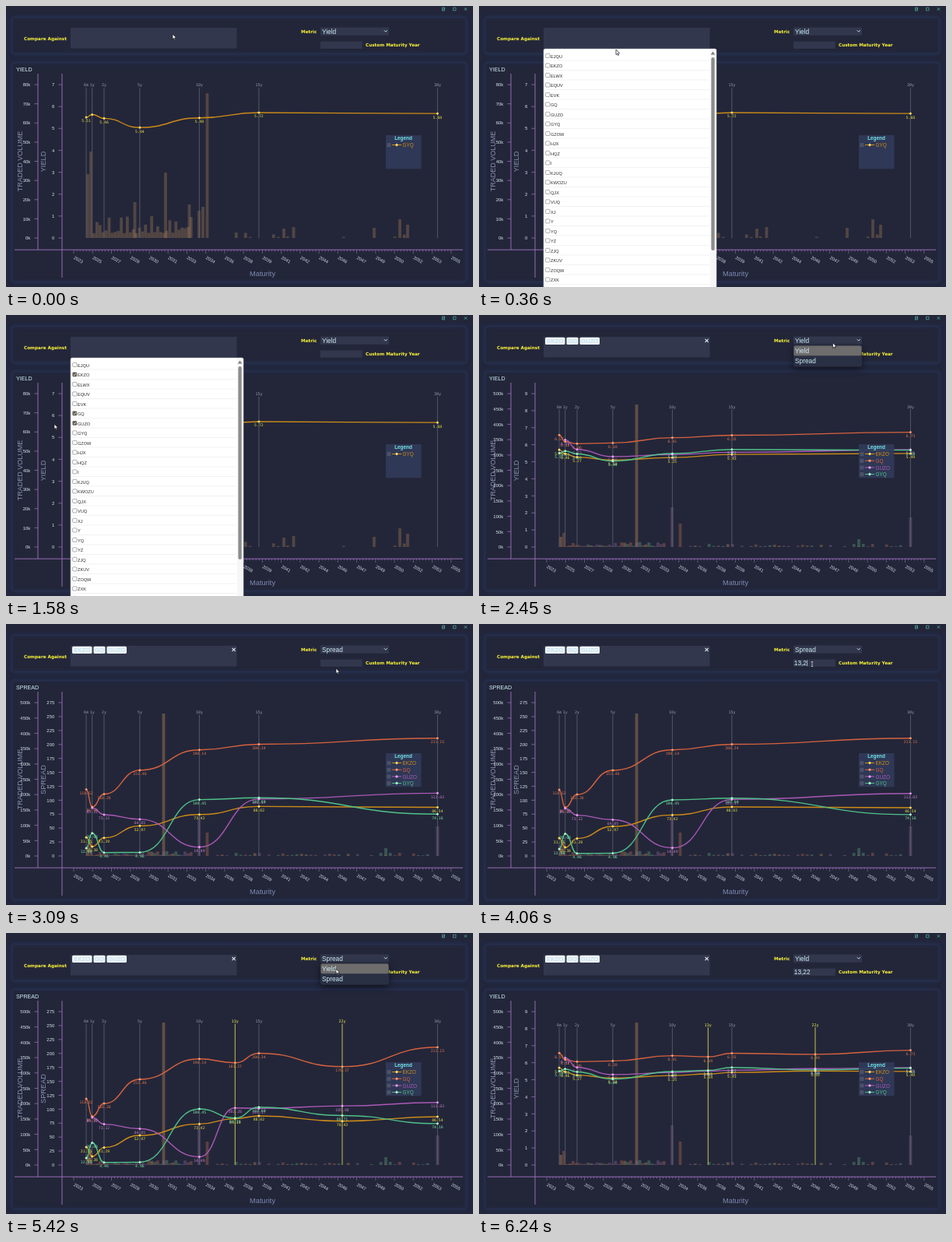
These frames come from a looping animation (600x361 px, 6.3 s). An HTML page with a canvas:

```html
<!DOCTYPE html>
<html lang="en">
<head>
<meta charset="utf-8">
<title>Yield comparison</title>
<style>
html, body { margin: 0; width: 100%; height: 100%; overflow: hidden; background: #22273d; }
canvas { display: block; width: 600px; height: 361px; }
</style>
</head>
<body>
<canvas id="stage"></canvas>
<script>
const W = 600, H = 361, LOOP = 6300, FLOOR = 298;
const canvas = document.getElementById('stage');
const g = canvas.getContext('2d');
const dpr = window.devicePixelRatio || 1;
canvas.width = W * dpr;
canvas.height = H * dpr;

const SANS = '"Liberation Sans", Arial, sans-serif';
const WIDE = '"DejaVu Sans", Verdana, sans-serif';
const MONO = '"DejaVu Sans Mono", monospace';
const PURPLE = '#a273c2', FIELD = '#32374d', PALE = '#d0eff5', YELLOW = '#fbf53a';
const TICK = '#d8e4ec', AXIS = '#8791b0';

// moments of the interaction, ms
const OPEN = 250, CLOSE = 1670, COMPARE = 1720, SPREAD = 2760, CUSTOM = 4330, BACK = 5500;
const TICKED = { EKZO: 730, GQ: 1010, GUZO: 1240 };
const TYPING = 3800, KEY = 80;
const POPUPS = [[2410, SPREAD], [5130, BACK]];
// arrival time, x, y
const STOPS = [
  [0, 214, 36], [360, 176, 56], [700, 89, 76], [990, 89, 126], [1220, 89, 138], [1550, 62, 140],
  [2400, 457, 34], [2700, 424, 57], [3600, 428, 50], [5100, 470, 31], [5400, 424, 46], [5950, 360, 140]
];
const TRAVEL = 420;

const ITEMS = ['EJQU', 'EKZO', 'ELWX', 'EQUV', 'EVK', 'GQ', 'GUZO', 'GYQ', 'GZOW', 'HJX', 'HQZ', 'I',
  'KJUQ', 'KWOZU', 'QJX', 'VUQ', 'XJ', 'Y', 'YQ', 'YZ', 'ZJQ', 'ZKUV', 'ZOQW', 'ZXK'];

const YEARS = [0.5, 1, 2, 5, 10, 13, 15, 22, 30];
const isCustom = y => y === 13 || y === 22;
// yield = risk-free rate + spread, unless a series brings its own rule
const RATE = [5.385, 5.31, 4.957, 4.57, 4.512, 4.512, 4.55, 4.731, 4.622];
const SOLO = [5.51, 5.63, 5.46, 5.04, 5.48, 5.55, 5.72, 5.58, 5.68];
const ORANGE = { line: '#cc8b18', dot: '#ffdf6a', label: '#e6df3e' };
const SERIES = [
  { name: 'EKZO', look: ORANGE,
    spread: [31.95, 15.38, 31.29, 52.97, 73.42, 83.13, 88.02, 78.43, 86.54] },
  { name: 'GQ', look: { line: '#d6623f', dot: '#ff9a70', label: '#e0764f' },
    spread: [118.52, 86.9, 110.26, 153.46, 190.14, 183.27, 200.34, 176.37, 211.15] },
  { name: 'GUZO', look: { line: '#aa59b6', dot: '#e9a0ee', label: '#c479cd' },
    spread: [null, 85.22, 73.12, 64.85, 14.49, 102.28, 101.37, 105.88, 112.02],
    rule: y => 5.75 - 0.95 * Math.exp(-y / 9.5) + 2.6 * Math.exp(-y / 1.6) },
  { name: 'GYQ', look: { line: '#4fc289', dot: '#b4f7cf', label: '#7de3a5' },
    spread: [12.4, 39.68, 4.46, 4.96, 100.45, 84.2, 103.6, 88.71, 74.16],
    rule: (y, i) => SOLO[i] }
];
for (const one of SERIES)
  one.yield = one.spread.map((v, i) => v === null ? null : one.rule ? one.rule(YEARS[i], i) : RATE[i] + v / 100);

// volume bars: seeded noise, dense up to 2033 and sparse after, under a few peaks
const BAR = ['#c08f5c', '#b56a52', '#8b6496', '#5fa081'];
function makeBars(seed, dense, sparse, chance, peaks) {
  const rand = () => (seed = (seed * 16807) % 2147483647) / 2147483647;
  const list = peaks.map(([x, h], i) => [x, h, i % 4]);
  for (let x = 113; x < 545; x += x < 238 ? 3.9 : 6) {
    const r = rand(), hue = Math.floor(rand() * 4);
    if (x < 238) list.push([x, dense * (0.25 + r * r), hue]);
    else if (x > 270 && rand() < chance) list.push([x, 1 + sparse * r * r, hue]);
  }
  return list;
}
const SOLO_BARS = makeBars(5, 24, 6, 0.25, [[105, 82], [109, 111], [165.5, 46], [205, 84], [235.5, 43],
  [248, 35], [253, 40], [258.5, 186], [357, 12], [369.5, 14], [473, 13], [506, 24], [516, 17]]);
const MIX_BARS = makeBars(11, 5, 3, 0.7, [[202.5, 183], [109, 18], [248, 51], [488, 10], [105, 13],
  [258.5, 30], [554.5, 38]]);

const lerp = (a, b, k) => a + (b - a) * k;
const ease = k => { k = Math.min(1, Math.max(0, k)); return k * k * (3 - 2 * k); };
const yearX = y => 95.4 + 15.3 * y;
const valueY = (v, top) => FLOOR - v * 197 / top;

function box(x, y, w, h, fill, r = 0, stroke) {
  g.beginPath();
  g.roundRect(x, y, w, h, r);
  if (fill) { g.fillStyle = fill; g.fill(); }
  if (stroke) { g.strokeStyle = stroke; g.stroke(); }
}
function line(color, width, ...p) {
  g.strokeStyle = color;
  g.lineWidth = width;
  g.beginPath();
  for (let i = 0; i < p.length; i += 2) g.lineTo(p[i], p[i + 1]);
  g.stroke();
}
function cross(x, y, r, color, width) {
  line(color, width, x - r, y - r, x + r, y + r);
  line(color, width, x + r, y - r, x - r, y + r);
}
function shape(color, x, y, ...p) {
  g.fillStyle = color;
  g.beginPath();
  for (let i = 0; i < p.length; i += 2) g.lineTo(x + p[i], y + p[i + 1]);
  g.closePath();
  g.fill();
}
const diamond = (x, y, r, color) => shape(color, x, y, 0, -r, r, 0, 0, r, -r, 0);
function text(s, x, y, size, color, align = 'left', font = SANS, weight = '') {
  g.font = `${weight} ${size}px ${font}`;
  g.fillStyle = color;
  g.textAlign = align;
  g.fillText(s, x, y);
}
function turned(s, x, y, angle, size, color) {
  g.save();
  g.translate(x, y);
  g.rotate(angle);
  text(s, 0, size * 0.36, size, color, 'center');
  g.restore();
}
function panel(x, y, w, h) {
  g.save();
  g.shadowColor = '#283760';
  g.shadowBlur = 4 * dpr;
  g.lineWidth = 0.8;
  box(x, y, w, h, '#232639', 2, '#283150');
  g.restore();
}

// S-shaped steps, level at every point
function curve(pts, color) {
  g.beginPath();
  pts.forEach(([x, y], i) => {
    if (!i) return g.moveTo(x, y);
    const [px, py] = pts[i - 1], mid = (px + x) / 2;
    g.bezierCurveTo(mid, py, mid, y, x, y);
  });
  g.strokeStyle = color;
  g.lineWidth = 1.4;
  g.stroke();
}

function scale(x, top, step, unit) {
  for (let v = 0; v <= top; v += step) {
    const y = valueY(v, top);
    line(PURPLE, 0.7, x - 4.5, y, x, y);
    text(v + unit, x - 9.7, y + 2.2, 6, TICK, 'right');
  }
}
function axes(s) {
  const name = s.spread ? 'SPREAD' : 'YIELD';
  text(name, 13, 83.6, 7.1, PALE);
  turned('TRADED VOLUME', 17.5, 199.5, -Math.PI / 2, 9, AXIS);
  turned(name, 48, 200, -Math.PI / 2, 9.2, AXIS);
  line(PURPLE, 0.9, 41, 87, 41, 313);
  line(PURPLE, 0.9, 72, 87, 72, 349);
  line(PURPLE, 0.9, 11, 313.2, 587, 313.2);
  scale(41, s.multi ? 500 : 80, s.multi ? 50 : 10, 'k');
  scale(72, s.top, s.spread ? 25 : 1, '');
  for (let i = 0; i <= 120; i++) {
    const x = 87 + i * 4.04;
    line(PURPLE, 0.6, x, 313, x, i % 6 ? 315.5 : 318);
  }
  for (let i = 0; i < 21; i++)
    turned(Math.floor(2023.9 + 1.58 * i), 93 + 24.25 * i, 325.8, 0.52, 5.7, '#d3dde8');
  text('Maturity', 329.5, 347.4, 9.3, '#7d8ab2', 'center');
}

function bars(list, k, colored) {
  g.globalAlpha = colored ? 0.38 : 0.3;
  for (const [x, h, hue] of list) {
    g.fillStyle = BAR[colored ? hue : 0];
    g.fillRect(x - 1.9, FLOOR - h * k, 3.8, h * k);
  }
  g.globalAlpha = 1;
}

function chart(s) {
  const list = s.multi ? SERIES : [SERIES[3]];
  const shown = YEARS.map((y, i) => i).filter(i => s.custom || !isCustom(YEARS[i]));
  const values = one => s.spread ? one.spread : one.yield;
  panel(8, 73, 583, 281);
  axes(s);
  bars(SOLO_BARS, 1 - s.mix, false);
  bars(MIX_BARS, s.mix, true);

  // maturity lines rise a fifth above the highest value
  const peak = valueY(1.2 * Math.max(...list.flatMap(values)), s.top);
  for (const i of shown) {
    const own = isCustom(YEARS[i]), x = yearX(YEARS[i]);
    line(own ? '#c3c24c' : '#60646f', own ? 1 : 0.8, x, peak, x, FLOOR);
    text(i ? YEARS[i] + 'y' : '6m', x, peak - 1.6, 5, own ? '#f0ec4c' : '#959ca8', 'center', MONO);
  }

  const yieldTop = lerp(7, 9, s.mix);
  for (const one of list) {
    const look = s.multi ? one.look : ORANGE;
    const idx = shown.filter(i => one.spread[i] !== null);
    const pts = idx.map(i => [yearX(YEARS[i]),
      lerp(valueY(one.yield[i], yieldTop), valueY(one.spread[i], 275), s.morph)]);
    g.globalAlpha = s.multi && one !== SERIES[3] ? s.mix : 1;
    curve(pts, look.line);
    pts.forEach(([x, y], k) => {
      diamond(x, y, 1.8, look.dot);
      if (s.multi || idx[k] !== 1)
        text(values(one)[idx[k]].toFixed(2), x, y + 6.4, 4.8, look.label, 'center', MONO);
    });
    g.globalAlpha = 1;
  }
  legend(s.multi, list);
}

function legend(multi, list) {
  box(488, 166, 45.5, 43.3, 'rgba(48,58,90,.92)');
  text('Legend', 510.5, 172.4, 6.4, '#74e6ea', 'center', SANS, 'bold');
  list.forEach((one, i) => {
    const look = multi ? one.look : ORANGE, y = 179 + 8.7 * i;
    box(489.3, y - 3, 5.2, 5.2, '#4b5267', 1);
    line(look.line, 1, 496, y - 0.5, 508, y - 0.5);
    diamond(502, y - 0.5, 2, look.dot);
    text(one.name, 509.5, y + 2.3, 6.4, look.line);
  });
}

function header(s) {
  const teal = '#55b5a5';
  panel(8, 15, 583, 46);
  g.lineWidth = 0.7;
  box(560.5, 2, 3, 4, null, 0, teal);
  line(teal, 0.7, 561, 5.5, 563.5, 2.2);
  box(574.5, 2.2, 3.5, 3.6, null, 0, teal);
  cross(590.5, 4, 1.7, teal, 0.8);
  text('Compare Against', 23, 43.6, 5.7, YELLOW, 'left', WIDE, 'bold');
  text('Metric', 379, 34.6, 5.7, YELLOW, 'left', WIDE, 'bold');
  text('Custom Maturity Year', 462, 52.4, 5.7, YELLOW, 'left', WIDE, 'bold');
  box(83, 28, 213.5, 26.6, FIELD);
  box(404, 27.5, 88, 10.2, FIELD);
  box(404, 45.6, 53.7, 9.2, FIELD);
  text(s.spread ? 'Spread' : 'Yield', 406, 35.6, 8.3, PALE);
  line(PALE, 0.9, 485.8, 31.2, 487.8, 33.2, 489.8, 31.2);

  const typed = '13,22'.slice(0, Math.max(0, Math.ceil((s.t - TYPING) / KEY)));
  text(typed, 404.8, 53, 8.3, PALE);
  if (s.t > TYPING - KEY && s.t < CUSTOM) {
    const x = 405.4 + g.measureText(typed).width;
    line(PALE, 0.7, x, 46.5, x, 54);
  }
  if (s.t >= CLOSE) {
    let x = 85;
    for (const name of Object.keys(TICKED)) {
      const w = name.length > 2 ? 25.5 : 15;
      box(x, 28.7, w, 9.3, '#eef4f6', 1.5);
      text(name, x + w / 2, 36, 7.6, '#b5deee', 'center');
      x += w + 2;
    }
    cross(292.6, 33, 2.1, '#dfe8ee', 1.1);
  }
}

function picker(t) {
  g.lineWidth = 0.6;
  box(83, 55, 222, 312, '#fff', 2, '#b9bcc4');
  ITEMS.concat('').forEach((name, i) => {
    const y = 64 + 12.5 * i, on = t >= TICKED[name];
    g.lineWidth = 0.6;
    box(85.7, y - 2.7, 5.2, 5.2, on ? '#5d5346' : '#fff', 0.8, '#777');
    if (on) line('#fff', 0.8, 86.8, y, 88, y + 1.2, 90, y - 1.5);
    text(name, 92, y + 2.9, 5.6, '#2c2c2c');
    line('#e9e9ec', 0.6, 84, y + 6, 296, y + 6);
  });
  box(297, 56, 7.6, 305, '#f6f6f7');
  shape('#7d7d7d', 300.5, 58.4, 0, 0, 2.8, 4.2, -2.8, 4.2);
  box(298.4, 66, 4.3, 248, '#8b8b8b', 2.1);
}

function popup(s, cy) {
  g.save();
  g.shadowColor = 'rgba(0,0,0,.5)';
  g.shadowBlur = 8 * dpr;
  g.shadowOffsetY = 3 * dpr;
  box(404, 38.4, 88, 28, '#2a3044', 3);
  g.restore();
  const row = cy < 39 ? +s.spread : +(cy > 52.5);
  box(404.5, 39.4 + 12.8 * row, 87, 12.8, '#6e6c6c', 2);
  text('Yield', 406, 48.7, 8.3, PALE);
  text('Spread', 406, 61.6, 8.3, PALE);
}

function cursorAt(t) {
  const i = STOPS.findIndex(stop => t <= stop[0]);
  if (i < 0) return null;
  const [t0, x0, y0] = STOPS[Math.max(0, i - 1)], [t1, x1, y1] = STOPS[i];
  const k = ease(1 - (t1 - t) / Math.max(1, Math.min(TRAVEL, t1 - t0)));
  return [lerp(x0, x1, k), lerp(y0, y1, k)];
}
function pointer(x, y) {
  shape('#fff', x, y, 0, 0, 0, 6.6, 1.5, 5.3, 2.5, 7.5, 3.5, 7.1, 2.6, 4.9, 4.6, 4.8);
  g.strokeStyle = '#15161c';
  g.lineWidth = 0.7;
  g.stroke();
}
function beam(x, y) {
  line('#dfe6ea', 0.7, x, y - 1.5, x, y + 4.5);
  for (const end of [y - 1.5, y + 4.5]) line('#dfe6ea', 0.7, x - 1.2, end, x + 1.2, end);
}

function draw(t) {
  const spread = t >= SPREAD && t < BACK, multi = t >= COMPARE;
  const s = {
    t, spread, multi,
    custom: t >= CUSTOM,
    mix: ease((t - COMPARE) / 350),
    morph: ease((t - SPREAD) / 350) - ease((t - BACK) / 280),
    top: spread ? 275 : multi ? 9 : 7
  };
  g.setTransform(dpr, 0, 0, dpr, 0, 0);
  g.fillStyle = '#22273d';
  g.fillRect(0, 0, W, H);
  box(0, 0, W, 9, '#222638');
  header(s);
  chart(s);
  if (t >= OPEN && t < CLOSE) picker(t);
  const at = cursorAt(t);
  if (POPUPS.some(([a, b]) => t >= a && t < b)) popup(s, at[1]);
  if (at) (at[1] > 45 && t > 3400 && t < 4700 ? beam : pointer)(...at);
}

let start;
function tick(now) {
  if (start === undefined) start = now;
  draw((now - start) % LOOP);
  requestAnimationFrame(tick);
}
draw(0);
requestAnimationFrame(tick);
</script>
</body>
</html>
```
